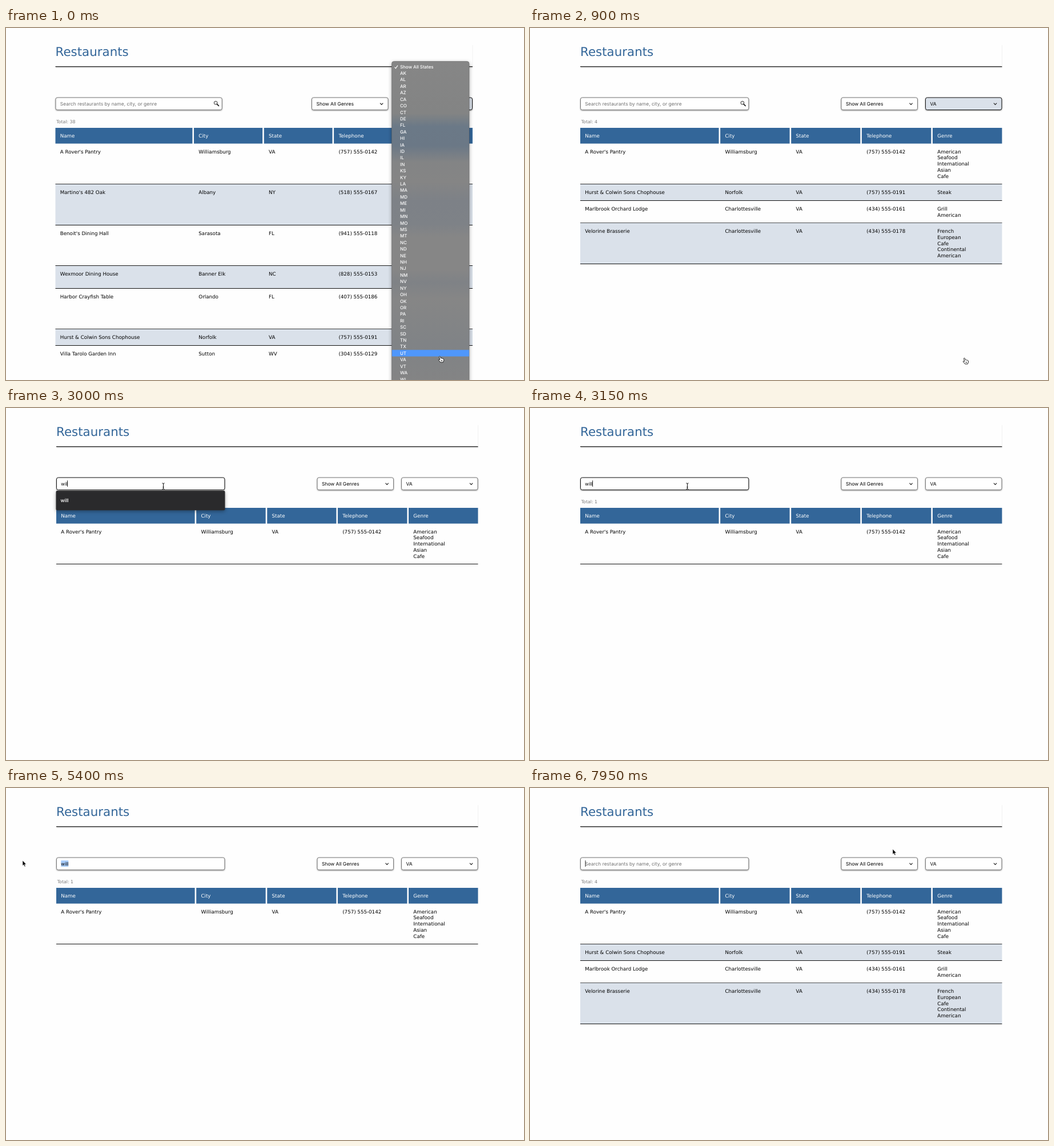
These frames come from a looping animation (907 by 617 pixels, 8000 ms). An HTML page:

```html
<!DOCTYPE html>
<html lang="en">
<head>
<meta charset="utf-8">
<title>Restaurants</title>
<style>
html, body { margin: 0; width: 100%; height: 100%; overflow: hidden; background: #fefefe; }
svg { display: block; width: 907px; height: 617px; text-rendering: geometricPrecision; }
text { font: 8.7px "DejaVu Sans", sans-serif; }
.title { font-size: 21.4px; fill: #336699; }
.total { font-size: 7.8px; fill: #777; }
.ui { font: 8.45px Inter, sans-serif; }
.hint { fill: #707070; }
.item { font: 500 7.9px Inter, sans-serif; fill: #fff; }
.suggest { font: 600 8.6px Inter, sans-serif; fill: #f2f2f2; }
.head { fill: #fff; }
.field { filter: drop-shadow(0 1.2px .8px rgba(0, 0, 0, .4)); }
.menu { filter: drop-shadow(0 2px 3px rgba(0, 0, 0, .35)); }
</style>
</head>
<body>
<svg id="stage" viewBox="0 0 907 617"></svg>
<script>
const LOOP = 8000, STEP = 150;
const stage = document.getElementById('stage');

// name | city | state | telephone | genres
const restaurants = [
  "A Rover's Pantry|Williamsburg|VA|(757) 555-0142|American,Seafood,International,Asian,Cafe",
  "Martino's 482 Oak|Albany|NY|(518) 555-0167|Steak,American,Seafood,International,Traditional",
  "Benoit's Dining Hall|Sarasota|FL|(941) 555-0118|European,French,Seafood,Belgian,Vegetarian",
  "Wexmoor Dining House|Banner Elk|NC|(828) 555-0153|American,Contemporary",
  "Harbor Crayfish Table|Orlando|FL|(407) 555-0186|Seafood,International,American,Oysters,Cafe",
  "Hurst & Colwin Sons Chophouse|Norfolk|VA|(757) 555-0191|Steak",
  "Villa Tarolo Garden Inn|Sutton|WV|(304) 555-0129|Cafe,Italian,Bistro,Contemporary,Vegetarian",
  "Marlbrook Orchard Lodge|Charlottesville|VA|(434) 555-0161|Grill,American",
  "Velorine Brasserie|Charlottesville|VA|(434) 555-0178|French,European,Cafe,Continental,American"
].map(line => line.split('|'));

const states = ('AK AL AR AZ CA CO CT DE FL GA HI IA ID IL IN KS KY LA MA MD ME MI MN MO MS MT ' +
  'NC ND NE NH NJ NM NV NY OH OK OR PA RI SC SD TN TX UT VA VT WA WI').split(' ');
const suggestions = ['will', 'steak', 'search', 'chef', 'italian', 'cafe'];
const headings = ['Name', 'City', 'State', 'Telephone', 'Genre'];
const columns = [0, .332, .5, .6675, .8355, 1.0035];

// time, x, y of the pointer
const route = [
  [0, 758.5, 575], [150, 759.5, 578], [1050, 759.5, 578], [1200, 735, 560], [1500, 500, 330],
  [1800, 290, 147], [1950, 275.5, 137], [3900, 275.5, 137], [4050, 240, 118], [4200, 165, 90],
  [4350, 120, 80], [4500, 112, 112], [4650, 111, 133], [4800, 94, 133], [4950, 36, 132],
  [5400, 29, 127], [7050, 29, 127], [7500, 360, 73], [7650, 500, 100], [7800, 612, 138],
  [7950, 635, 107], [8000, 635, 107]
];

const within = (t, a, b) => t >= a && t < b;
const inside = (p, x, y, w, h) => within(p.x, x, x + w) && within(p.y, y, y + h);

function text(x, y, str, cls = '') {
  return `<text x="${x}" y="${y}" class="${cls}">${str.replace(/&/g, '&amp;')}</text>`;
}
function rect(x, y, w, h, fill, extra = '') {
  return `<rect x="${x}" y="${y}" width="${w}" height="${h}" fill="${fill}" ${extra}/>`;
}
function field(x, w, active, fill) {
  const edge = active ? '#111' : '#777';
  return rect(x + .5, 122, w - 1, 21.5, fill, `rx="3" stroke="${edge}" class="field"`);
}
function select(x, label, active) {
  return field(x, 134.5, active, active ? '#dae1ea' : '#fff') + text(x + 8.5, 135.6, label, 'ui') +
    `<path d="M${x + 120},131.7l2.6,2.6l2.6,-2.6" fill="none" stroke="#222" stroke-width="1.2"/>`;
}

function pointerAt(t) {
  const i = route.findIndex(k => k[0] > t);
  const [a, b] = [route[i - 1], route[i]];
  const f = (t - a[0]) / (b[0] - a[0]);
  return { x: a[1] + (b[1] - a[1]) * f, y: a[2] + (b[2] - a[2]) * f };
}

function drawPointer(p, kind) {
  const shapes = {
    arrow: '<path d="M0,0V9.3L2.1,7.4L3.6,11L5.2,10.3L3.7,6.9H6.5Z" fill="#000" stroke="#fff" stroke-width=".6"/>',
    beam: '<path d="M-2,-5.3Q0,-5.3 0,-4Q0,-5.3 2,-5.3M0,-4V4M-2,5.3Q0,5.3 0,4Q0,5.3 2,5.3M-1.2,1.8H1.2" fill="none" stroke="#111"/>',
    hand: '<path d="M0,1Q1,-.4 2,1L3,4Q4,3.2 4.8,4.2Q5.8,3.6 6.5,4.7Q7.8,4.4 8,5.6V8L6.8,11H2.2L-1.2,6.8Q-1,5.5 .3,6L1.3,6.8Z" fill="#fff" stroke="#111" stroke-width=".9"/>' +
      '<path d="M3.5,7V9.3M5,7V9.3" stroke="#111" stroke-width=".7"/>'
  };
  return `<g transform="translate(${p.x} ${p.y})">${shapes[kind]}</g>`;
}

function drawTable(left, width, rows) {
  const colX = i => left + width * columns[i];
  let out = '', top = 202.3;
  headings.forEach((h, i) => {
    out += rect(colX(i), 175, colX(i + 1) - colX(i) - 2.6, 27.6, '#336699') + text(colX(i) + 8.3, 192.2, h, 'head');
  });
  rows.forEach((row, n) => {
    const genres = row[4].split(',');
    const bottom = top + 17.8 + 10.75 * genres.length;
    if (n % 2) out += rect(left, top, width, bottom - top, '#dae1ea');
    out += rect(left, Math.floor(bottom), width, 1, '#111');
    row.slice(0, 4).forEach((cell, i) => out += text(colX(i) + 8.3, top + 17.4, cell));
    genres.forEach((g, i) => out += text(colX(4) + 8.3, top + 17.4 + 10.75 * i, g));
    top = bottom;
  });
  return out;
}

function drawStateMenu(t) {
  const hot = t < 150 ? 44 : within(t, 300, 450) ? -1 : 45;
  const opacity = t < 600 ? 1 : t < 750 ? .8 : .4;
  const stops = [[0, '#868686'], [.16, '#838484'], [.2, '#6b7987'], [.26, '#6b7886'], [.31, '#838485'],
    [.37, '#858585'], [.43, '#7d8187'], [.5, '#7e8287'], [.54, '#868686'], [.64, '#868686'],
    [.68, '#7f8286'], [.73, '#868686'], [.87, '#808386'], [1, '#848484']];
  let out = `<defs><linearGradient id="blur" x2="0" y2="1">` +
    stops.map(([o, c]) => `<stop offset="${o}" stop-color="${c}"/>`).join('') +
    `</linearGradient></defs><g opacity="${opacity}">` +
    rect(675.5, 58.5, 135.5, 570, 'url(#blur)', 'rx="4" stroke="#666" stroke-width=".6" class="menu"');
  if (hot > 0) out += rect(675.8, 62 + 11.415 * hot, 135, 11.4, '#4f97fb');
  ['Show All States', ...states].forEach((s, i) => out += text(690, 70.6 + 11.415 * i, s, 'item'));
  return out + '<path d="M680.5,68.5l1.8,2.3l3.6,-5.2" fill="none" stroke="#fff" stroke-width="1.2"/></g>';
}

function drawSuggestions(list) {
  return rect(87.5, 145, 296, 10 + 24.2 * list.length, '#2a2a2c', 'rx="2" class="menu"') +
    list.map((s, i) => text(95.5, 165.1 + 24.2 * i, s, 'suggest')).join('');
}

function render(t) {
  const filtered = t >= 900;
  const left = filtered ? 88 : 86.5, width = filtered ? 738.5 : 730.5, right = left + width;
  const typed = within(t, 2700, 6900) ? 'will'.slice(0, Math.floor((t - 2700) / STEP) + 1) : '';
  const rows = filtered
    ? restaurants.filter(r => r[2] === 'VA' && r.join().toLowerCase().includes(typed))
    : restaurants.slice(0, 7);
  const p = pointerAt(t);
  const searchWidth = width * .4;
  const overSearch = inside(p, left, 122, searchWidth, 22);
  const overGenres = inside(p, right - 282, 122, 134, 22);
  const focused = t >= 1950;
  const selected = within(t, 4800, 6900);
  const caret = [[1950, 2400], [2700, 3450], [4050, 4800], [6900, 7500], [7950, LOOP]]
    .some(([a, b]) => within(t, a, b));

  let out = rect(0, 0, 907, 617, '#fefefe') + text(left, 48.8, 'Restaurants', 'title');
  out += rect(right - .5, 30, 1, 37, '#f1f1f1') + rect(left, 67, width, 1.2, '#222') +
    rect(left + .5, 68.2, width - .5, 1, '#aaa') + rect(left + 1, 69.2, width - 1, 1, '#e2e2e2');

  out += field(left, searchWidth, overSearch || within(t, 4650, 5400), '#fff');
  if (selected) out += rect(96.3, 127, 13, 11, '#a8cdfb');
  out += typed ? text(left + 8.3, 135.6, typed, 'ui')
    : text(left + 8.3, 135.6, 'Search restaurants by name, city, or genre', 'ui hint');
  if (caret) out += rect(typed ? 101 + 2.05 * typed.length : 96.6, 127, .9, 11, '#111');
  if (!focused) {
    const x = left + searchWidth - 11.5;
    out += `<circle cx="${x}" cy="131.2" r="2.9" fill="#f4f4f4" stroke="#333"/>` +
      `<path d="M${x + 2.2},133.4l3,3" stroke="#222" stroke-width="1.8" stroke-linecap="round"/>`;
  }
  out += select(right - 282, 'Show All Genres', overGenres);
  out += select(right - 134.5, filtered ? 'VA' : 'Show All States', !focused);

  out += text(left + 1.7, 166.6, 'Total: ' + (filtered ? rows.length : 38), 'total');
  out += drawTable(left, width, rows);

  if (!filtered) out += drawStateMenu(t);
  const matches = suggestions.filter(s => s.startsWith(typed) && s !== typed);
  if (within(t, 1950, 3150) && matches.length) out += drawSuggestions(matches);

  const kind = t < 1200 || overGenres ? 'hand' : overSearch ? 'beam' : 'arrow';
  return out + drawPointer(p, kind);
}

let shown = -1;
const start = performance.now();
function tick() {
  const elapsed = (performance.now() - start) % LOOP;
  const step = Math.floor(elapsed / STEP);
  if (step !== shown) {
    shown = step;
    stage.innerHTML = render(step * STEP);
  }
  requestAnimationFrame(tick);
}
tick();
</script>
</body>
</html>
```
